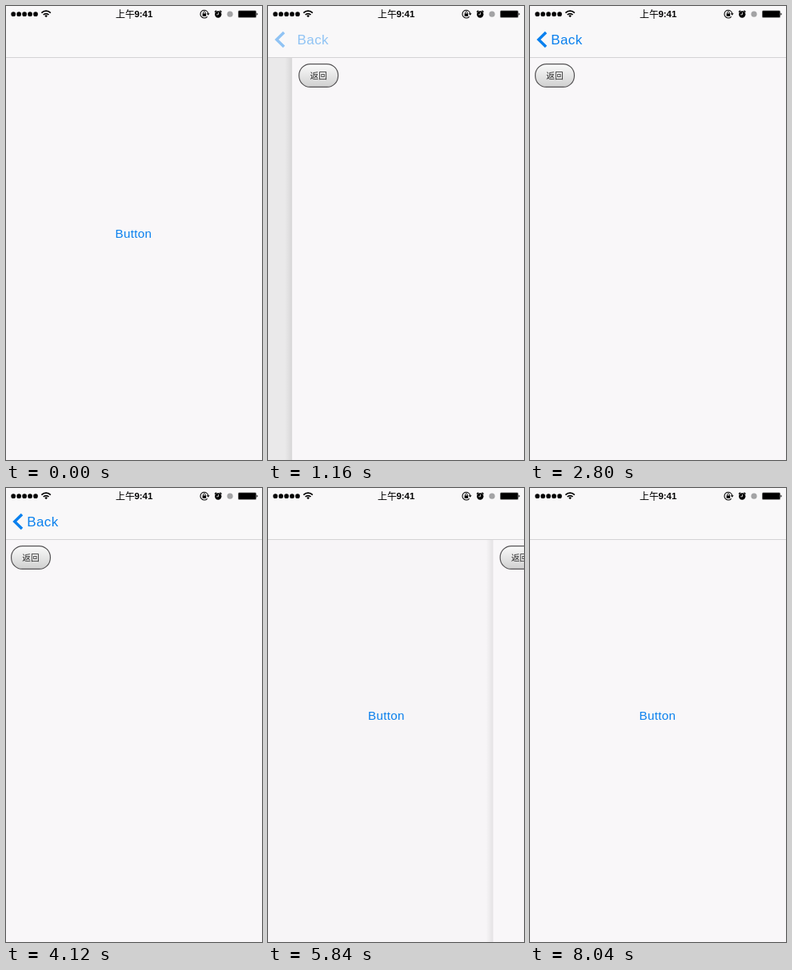
Animation of 320x568 px, one loop 9240 ms. Source, as an HTML page:

```html
<!DOCTYPE html>
<html lang="zh-CN">
<head>
<meta charset="utf-8">
<title>Navigation push and pop</title>
<style>
  html, body { margin: 0; width: 100%; height: 100%; overflow: hidden; background: #f9f7f9; }
  svg { display: block; width: 100vw; height: 100vh; }
  text { font-family: "Liberation Sans", Arial, sans-serif; }
  .cjk { font-family: "Noto Sans CJK SC", "Noto Sans CJK", sans-serif; }
</style>
</head>
<body>
<svg viewBox="0 0 320 568">
  <defs>
    <linearGradient id="metal" x2="0" y2="1">
      <stop stop-color="#fafafa"/>
      <stop offset=".5" stop-color="#e6e6e6"/>
      <stop offset="1" stop-color="#cfcfcf"/>
    </linearGradient>
    <linearGradient id="shade">
      <stop stop-opacity="0"/>
      <stop offset="1" stop-opacity=".08"/>
    </linearGradient>
  </defs>

  <rect width="320" height="568" fill="#f9f7f9"/>
  <text id="button" x="136.6" y="289.6" font-size="15.2" letter-spacing=".3" fill="#0a80ee">Button</text>
  <rect id="dim" width="320" height="568"/>

  <g id="panel">
    <rect id="shadow" x="-9" y="64" width="9" height="504" fill="url(#shade)"/>
    <rect width="330" height="568" fill="#f9f7f9"/>
    <g id="pill">
      <rect x=".6" y="72.6" width="48.8" height="28.8" rx="14" fill="url(#metal)" stroke="#545254" stroke-width="1.2"/>
      <text class="cjk" x="25" y="91.2" font-size="10.7" font-weight="500" text-anchor="middle" fill="#2a2a2a">返回</text>
    </g>
  </g>

  <rect width="320" height="64" fill="#f9f8f9"/>
  <rect y="64" width="320" height="1" fill="#d3d2d4"/>
  <g id="back" fill="#0a80ee">
    <path d="M20 32.9 10.8 42 20 51.1" fill="none" stroke="#0a80ee" stroke-width="3.5"/>
    <text id="label" x="26.2" y="48" font-size="17" letter-spacing=".4">Back</text>
  </g>

  <g id="status">
    <path d="M9.2 10.2h28" stroke="#000" stroke-width="5.7" stroke-linecap="round" stroke-dasharray="0 6.95"/>
    <g fill="none" stroke="#000" stroke-width="1.7">
      <path d="M44.4 8.6a8 8 0 0 1 11.4 0"/>
      <path d="M46.7 11a4.8 4.8 0 0 1 6.8 0"/>
    </g>
    <path d="M48.3 12.2a2.5 2.5 0 0 1 3.6 0L50.1 14.2z"/>
    <text class="cjk" x="137" y="15" font-size="12" font-weight="500">上午</text>
    <text x="160.4" y="14.2" font-size="11.5" font-weight="bold">9:41</text>
    <path d="M251.6 13.3A4.9 4.9 0 1 1 252.7 9.4" fill="none" stroke="#000" stroke-width="1.1"/>
    <path d="M250.8 9.2h3.8l-1.9 2.5z"/>
    <rect x="245.6" y="9.3" width="4.6" height="3.5"/>
    <path d="M246.5 9.5V8.4a1.4 1.4 0 0 1 2.8 0v1.1" fill="none" stroke="#000" stroke-width=".9"/>
    <circle cx="265.2" cy="10.5" r="4.2"/>
    <path d="M260.9 7.6 263 5.7M269.5 7.6 267.4 5.7" stroke="#000" stroke-width="1.3"/>
    <path d="M265.4 8v2.8h-2.2" fill="none" stroke="#fff" stroke-width=".8"/>
    <circle cx="280" cy="10.2" r="3.6" fill="#a3a3a5"/>
    <rect x="290" y="5.5" width="23" height="9.2" rx="1.5" fill="#777"/>
    <rect x="290.8" y="6.3" width="21.4" height="7.6" rx=".8"/>
    <path d="M313.4 8.4a1.8 1.8 0 0 1 0 3.4z"/>
  </g>
</svg>
<script>
const LOOP = 9240, STEP = 40, W = 320;
const $ = id => document.getElementById(id);
const clamp = v => Math.max(0, Math.min(1, v));
const ramp = (t, a, b) => clamp((t - a) / (b - a));
const decay = (t, start, tau, power) => Math.exp(-Math.pow(Math.max(0, t - start) / tau, power));
const move = (id, x) => $(id).setAttribute("transform", `translate(${x.toFixed(2)} 0)`);
const fade = (id, a) => $(id).setAttribute("opacity", a.toFixed(3));

// Distance of the top screen from its resting place
function panelX(t) {
  if (t < 680) return W;
  if (t < 1600) return 223 * decay(t, 680, 317, 1.67);
  if (t < 5280) return 0;
  if (t < 6600) return W * (1 - decay(t, 5260, 382, 1.8));
  return W;
}

function draw(t) {
  const x = panelX(t), out = x / W;
  const popping = t >= 5280;
  const shown = t >= 680 && t < 6200;

  move("panel", shown ? x : W + 20);
  move("pill", popping ? 8 : 8 - 2 * ramp(t, 1600, 1880));
  fade("shadow", x > 0 ? 1 : 0);
  fade("dim", shown ? 0.065 * (1 - out) : 0);

  move("button", -0.3 * (W - x));
  const press = ramp(t, 240, 440), release = ramp(t, 680, 1160);
  fade("button", 1 - 0.8 * press * (1 - release));

  move("label", popping ? 74 * out : 110 * out);
  fade("back", !shown ? 0 : popping ? clamp(1 - 1.65 * out) : ramp(t, 866, 1541));
}

function tick(now) {
  draw(Math.floor(now % LOOP / STEP) * STEP);
  requestAnimationFrame(tick);
}
draw(0);
requestAnimationFrame(tick);
</script>
</body>
</html>
```
